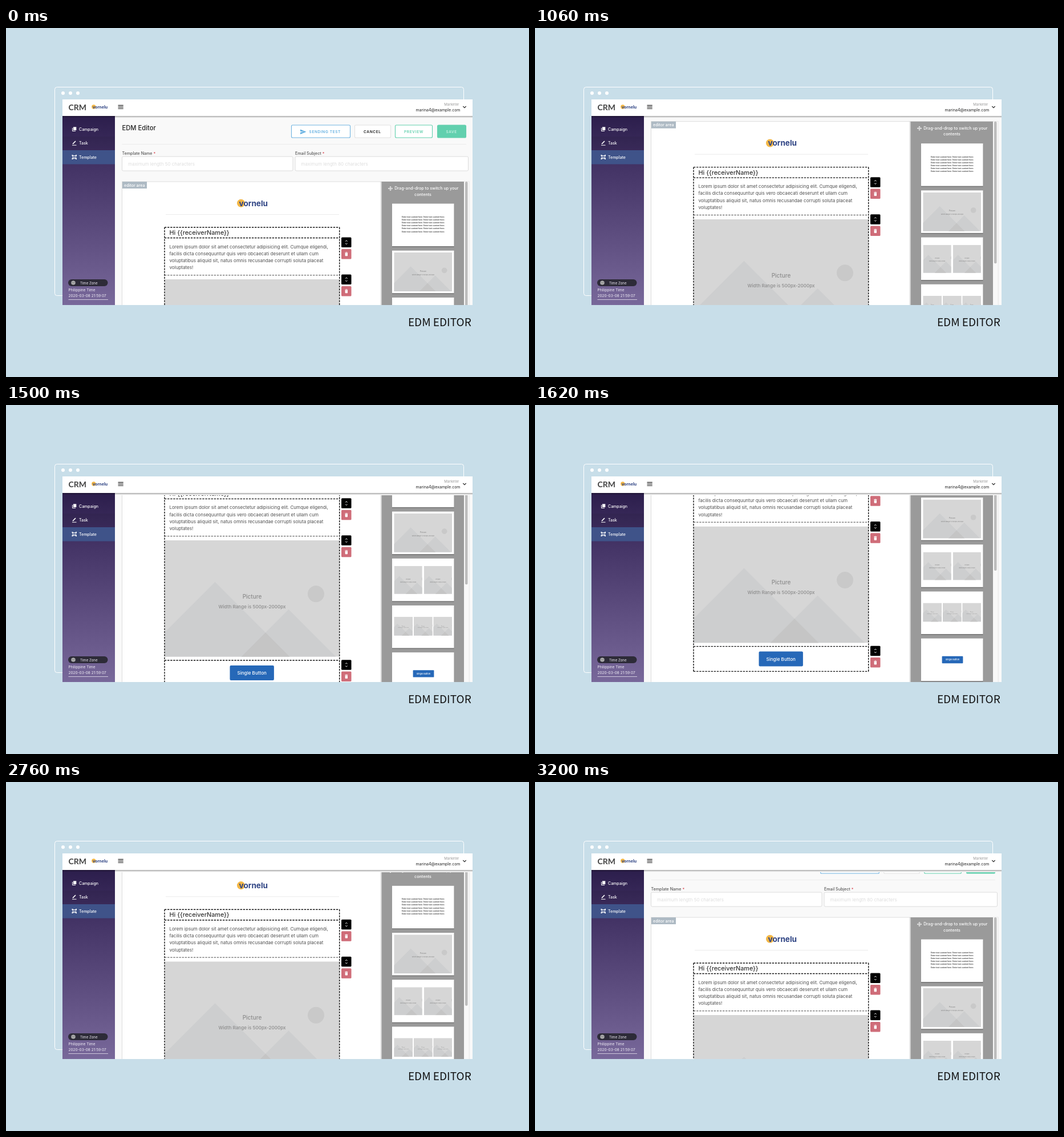
These frames come from a looping animation (917 px wide and 611 px high, 3320 ms). An HTML page:

```html
<!DOCTYPE html>
<html lang="en">
<head>
<meta charset="utf-8">
<title>EDM Editor</title>
<style>
  html, body { margin: 0; width: 100%; height: 100%; overflow: hidden; background: #c8dee9; }
  svg { display: block; }
  text { font-family: Inter, sans-serif; dominant-baseline: central; }
  .mid { text-anchor: middle; }
  .end { text-anchor: end; }
  .medium { font-weight: 500; }
  .caps { font-size: 6.5px; font-weight: 600; letter-spacing: .65px; }
  .label { font-size: 7.1px; font-weight: 500; fill: #555; }
  .hint { font-size: 8px; fill: #dedede; }
  .field { fill: #fff; stroke: #dcdcdc; }
  .line { fill: none; stroke: #fff; }
  .dash { fill: none; stroke: #111; stroke-width: 1.4; stroke-dasharray: 3.3 1.8; }
  .title { font: 300 19px "Noto Sans CJK SC", "Noto Sans CJK JP", Lato, sans-serif; dominant-baseline: auto; }
</style>
</head>
<body>
<svg width="917" height="611" viewBox="0 0 917 611">
  <defs>
    <linearGradient id="purple" x2="0" y2="1">
      <stop stop-color="#2c1e4c"/><stop offset=".28" stop-color="#443466"/><stop offset="1" stop-color="#78689a"/>
    </linearGradient>
    <linearGradient id="shade" x2="0" y2="1">
      <stop stop-color="#000" stop-opacity=".32"/><stop offset="1" stop-color="#000" stop-opacity=".02"/>
    </linearGradient>
    <clipPath id="view"><path d="M191 158H818V485H191z"/></clipPath>

    <g id="logo">
      <circle r="7" fill="#f3b746"/>
      <text x="-3.5" font-size="13.6" font-weight="700" fill="#2f4484">vornelu</text>
    </g>

    <symbol id="picture" viewBox="0 0 306 204" preserveAspectRatio="xMidYMid slice">
      <path fill="#d6d6d6" d="M0 0H306V204H0z"/>
      <path fill="#cdcecf" d="M88 73L219 204H0V161z"/>
      <path fill="#cdcecf" d="M217 121L300 204H134z"/>
      <path fill="#c5c5c5" d="M176.500 161.500L219 204H134z"/>
      <circle cx="265" cy="94" r="14.500" fill="#c9c9c9"/>
      <g class="mid medium" fill="#8c8c8c">
        <text x="153" y="98" font-size="10">Picture</text>
        <text x="153" y="116" font-size="8.100">Width Range is 500px-2000px</text>
      </g>
    </symbol>

    <g id="button">
      <rect x="-38.700" y="-13" width="77.400" height="26" rx="2" fill="#2668b8"/>
      <text class="mid medium" font-size="8.100" fill="#fff">Single Button</text>
    </g>

    <g id="tools">
      <rect x="588" width="17.500" height="17.500" rx="1.500"/>
      <path class="line" d="M595 7.200l1.800-1.800 1.800 1.800M595 10.400l1.800 1.800 1.800-1.800"/>
      <rect x="588" y="20.400" width="17.500" height="17.500" rx="1.500" fill="#cf6d79"/>
      <path fill="#fff" d="M594.300 26.200h1.500l.5-.6h1l.5 .6h1.500v.9h-5zM594.600 27.600h4.400v4.400q0 .8-.8 .8h-2.800q-.8 0-.8-.8z"/>
    </g>

    <g id="card">
      <rect x="677" y="1" width="108.500" height="75" fill="#000" opacity=".25"/>
      <rect x="677" width="108.500" height="74.500" fill="#fff"/>
    </g>
    <text id="filler" class="mid medium" x="731.700" y="331" font-size="3.330" fill="#222">Enter text content here. Enter text content here.</text>
  </defs>

  <rect class="line" x="85.500" y="103.500" width="717" height="365" rx="4"/>
  <g fill="#fff"><circle cx="100" cy="114" r="3"/><circle cx="113" cy="114" r="3"/><circle cx="126" cy="114" r="3"/></g>
  <path fill="#f9f9f9" d="M99 125H818V485H99z"/>

  <g clip-path="url(#view)">
    <g id="page">
      <text class="medium" x="203.500" y="175" font-size="11.200" fill="#222">EDM Editor</text>
      <g stroke-width="1.100">
        <rect x="500.500" y="170" width="103" height="22" rx="2" fill="#fff" stroke="#70b4e2"/>
        <rect x="611.500" y="170" width="63" height="22" rx="2" fill="#fff" stroke="#e2e2e2"/>
        <rect x="682.500" y="170" width="65" height="22" rx="2" fill="#fff" stroke="#62d0ae"/>
        <rect x="756.500" y="170" width="50" height="22" rx="2" fill="#62d0ae" stroke="#62d0ae"/>
      </g>
      <path fill="#62aee0" d="M516 177.500l10.500 4.300-10.500 4.300v-3.400l7-.9-7-.9z"/>
      <g class="caps">
        <text x="531.500" y="181.500" fill="#62aee0">SENDING TEST</text>
        <text x="627" y="181.500" fill="#222">CANCEL</text>
        <text x="698" y="181.500" fill="#62d0ae">PREVIEW</text>
        <text x="771.500" y="181.500" fill="#d5f5ea" font-weight="500">SAVE</text>
      </g>
      <path stroke="#ececec" d="M203.500 203.500H807"/>

      <text class="label" x="203.500" y="219.500">Template Name <tspan fill="#d8434e">*</tspan></text>
      <text class="label" x="507" y="219.500">Email Subject <tspan fill="#d8434e">*</tspan></text>
      <rect class="field" x="203.500" y="225" width="299.500" height="25" rx="2"/>
      <rect class="field" x="507" y="225" width="303.500" height="25" rx="2"/>
      <text class="hint" x="214" y="238">maximum length 50 characters</text>
      <text class="hint" x="517.500" y="238">maximum length 80 characters</text>

      <rect x="203.500" y="269" width="608.500" height="500" fill="#fff" stroke="#dedede"/>
      <rect x="204" y="269" width="43" height="12" fill="#aebac4"/>
      <text class="medium" x="207" y="275" font-size="7.100" fill="#fff">editor area</text>

      <use href="#logo" transform="translate(412 306.800)"/>
      <path stroke="#ebebeb" d="M280 326.500H584"/>
      <text class="medium" x="286.500" y="358.500" font-size="10.800" fill="#333">Hi {{receiverName}}</text>
      <text font-size="8.050" fill="#505050">
        <tspan x="286.500" y="382.500">Lorem ipsum dolor sit amet consectetur adipisicing elit. Cumque eligendi,</tspan>
        <tspan x="286.500" y="394.800">facilis dicta consequuntur quis vero obcaecati deserunt et ullam cum</tspan>
        <tspan x="286.500" y="407">voluptatibus aliquid sit, natus omnis recusandae corrupti soluta placeat</tspan>
        <tspan x="286.500" y="419.300">voluptates!</tspan>
      </text>
      <use href="#picture" x="278.500" y="440" width="306" height="204"/>
      <use href="#button" x="431.200" y="672.200"/>
      <path class="dash" d="M278 349H585M278 367.500H585M278 650.200H585M278 694H585M278 349V694M584.700 349V694"/>
      <path class="dash" style="stroke:#444;stroke-width:1" d="M278 432.800H585"/>
      <use href="#tools" y="366.500"/>
      <use href="#tools" y="431.500"/>
      <use href="#tools" y="649.300"/>

      <path fill="#000" opacity=".12" d="M656.500 269H658.500V769H656.500z"/>
      <path fill="#9a9a9a" d="M658.500 269H803V769H658.500z"/>
      <path fill="#f8f8f8" d="M803 269H811.500V769H803z"/>
      <rect x="805" y="269" width="4.500" height="248.500" rx="2" fill="#bcbcbc"/>
      <path class="line" d="M670.500 281h7M674 277.500v7M672.800 278.700l1.200-1.200 1.200 1.200M672.800 283.300l1.200 1.200 1.200-1.200M671.700 279.800l-1.200 1.200 1.200 1.200M676.300 279.800l1.200 1.200-1.200 1.200" stroke-width=".9"/>
      <g class="mid medium" font-size="7.150" fill="#fff">
        <text x="737.300" y="280.600">Drag-and-drop to switch up your</text>
        <text x="731" y="291.300">contents</text>
      </g>
      <use href="#card" y="307.500"/>
      <use href="#card" y="389.700"/>
      <use href="#card" y="471.900"/>
      <use href="#card" y="554.100"/>
      <use href="#card" y="636.300"/>
      <use href="#filler"/><use href="#filler" y="5.100"/><use href="#filler" y="10.200"/>
      <use href="#filler" y="15.300"/><use href="#filler" y="20.400"/><use href="#filler" y="25.500"/>
      <use href="#picture" x="680.300" y="393" width="102" height="68"/>
      <use href="#picture" x="680.800" y="485" width="48.800" height="49"/>
      <use href="#picture" x="733" y="485" width="48.800" height="49"/>
      <use href="#picture" x="680.500" y="574" width="32.500" height="33"/>
      <use href="#picture" x="715" y="574" width="32.500" height="33"/>
      <use href="#picture" x="749.500" y="574" width="32.500" height="33"/>
      <use href="#button" transform="translate(732 673.600) scale(.475)"/>
    </g>
  </g>

  <path fill="url(#purple)" d="M99 154H191V485H99z"/>
  <path fill="#000" opacity=".06" d="M99 190H191V214H99z"/>
  <path fill="#3f5389" d="M99 214H191V238.500H99z"/>
  <g class="medium" font-size="7" fill="#fff">
    <text x="128" y="177">Campaign</text>
    <text x="128" y="201.500">Task</text>
    <text x="128" y="226">Template</text>
  </g>
  <path fill="#fff" d="M118 173.300h5.300v5.700h-5.300z"/>
  <path class="line" d="M116.500 174.800v5.700h5.500"/>
  <path class="line" d="M116 205.200h7.500"/>
  <path class="line" stroke-width="1.700" d="M117 203l5-5"/>
  <path class="line" d="M117 223.500h5.500v5h-5.500zM118.300 227.500l1.300-2 1.500 2"/>
  <path fill="#fff" d="M115.500 222h2v2h-2zM122 222h2v2h-2zM115.500 228h2v2h-2zM122 228h2v2h-2z"/>
  <rect x="109" y="440" width="69.500" height="12" rx="6" fill="#2d2b38"/>
  <circle cx="118" cy="446" r="3.600" fill="#ddd"/>
  <path fill="none" stroke="#555" stroke-width=".6" d="M114.500 446h7M118 442.500v7M116.500 443q-1 3 0 6M119.500 443q1 3 0 6"/>
  <g fill="#f2eff7">
    <text x="130" y="446" font-size="6.050">Time Zone</text>
    <text x="109.500" y="459.200" font-size="6.500">Philippine Time</text>
    <text x="109.500" y="468.700" font-size="6.500">2020-03-08 21:59:07</text>
  </g>
  <path stroke="#cfc8dc" d="M109.500 475.500H179"/>

  <path fill="#fff" d="M99 125H818V154H99z"/>
  <path fill="url(#shade)" d="M99 154H818V157.500H99z"/>
  <text x="109.500" y="138.300" font-size="14" font-weight="700" fill="#444" style="font-family:Lato,sans-serif">CRM</text>
  <use href="#logo" transform="translate(153.800 138) scale(.52)"/>
  <path stroke="#333" stroke-width="1.300" d="M196.500 135.500h9.200M196.500 138.300h9.200M196.500 141.100h9.200"/>
  <text class="end" x="794.300" y="133" font-size="6.150" fill="#999">Marketer</text>
  <text class="end" x="796.500" y="143.300" font-size="7" fill="#222">marina4@example.com</text>
  <path fill="none" stroke="#333" stroke-width="1.300" d="M801.300 137l2.700 2.700 2.700-2.700"/>

  <text class="title mid" x="760.300" y="522" fill="#111">EDM EDITOR</text>
</svg>
<script>
  const LOOP = 3320;
  const downSteps = [720, 840, 940, 1060, 1160, 1280, 1400, 1500, 1620];
  const upSteps = [2420, 2540, 2640, 2760, 2880, 2980, 3100, 3200];
  const page = document.getElementById("page");

  const passed = (steps, t) => steps.filter(s => s <= t).length;

  // The page scrolls in even steps, with a larger first one each way.
  function scrollAt(t) {
    const up = passed(upSteps, t);
    if (up) return 196 - 23.43 * (up - 1);
    const down = passed(downSteps, t);
    return down ? 32 + 24.45 * (down - 1) : 0;
  }

  function draw() {
    page.setAttribute("transform", `translate(0 ${-scrollAt(performance.now() % LOOP)})`);
    requestAnimationFrame(draw);
  }
  draw();
</script>
</body>
</html>
```
